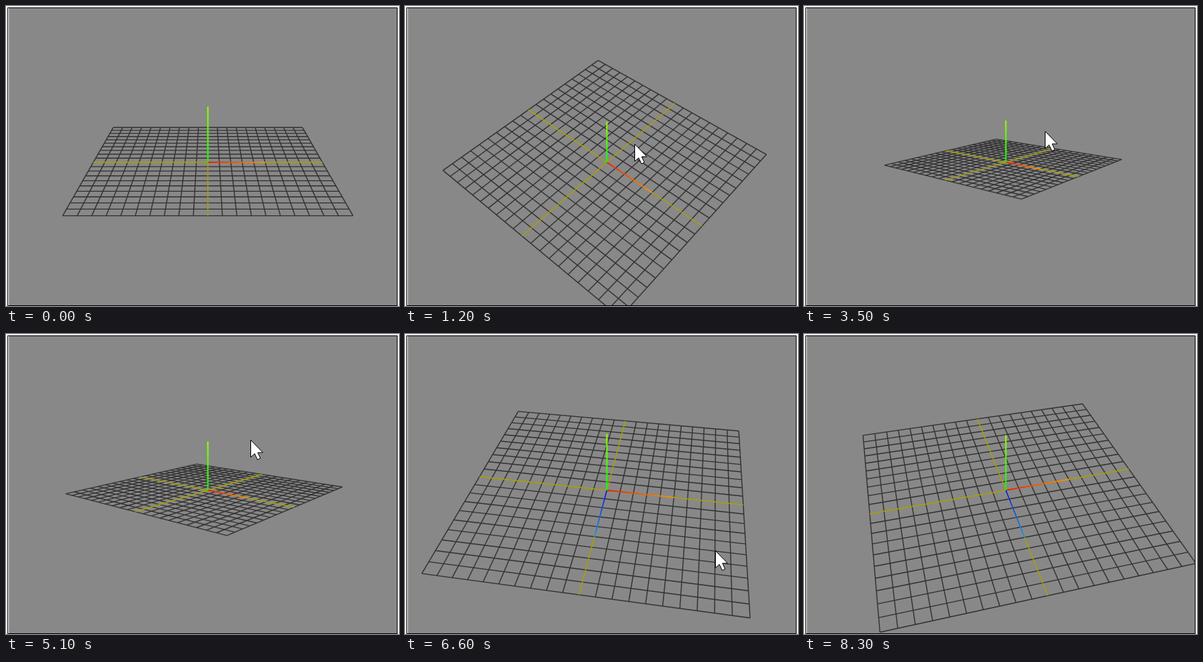
Animation, 550 px wide and 420 px high, one loop 8400 ms. Source, as an HTML page with a canvas:

```html
<!DOCTYPE html>
<html lang="en">
<head>
<meta charset="utf-8">
<title>Orbiting grid</title>
<style>
  html, body { margin: 0; width: 100%; height: 100%; overflow: hidden; background: #fff; }
  canvas { display: block; }
</style>
</head>
<body>
<canvas id="stage" width="550" height="420"></canvas>
<script>
const ctx = document.getElementById('stage').getContext('2d');
const LOOP = 8400, STEP = 100;
const CENTER = { x: 282.5, y: 218.8 };
const FOCAL = 707, BASE_DISTANCE = 4.41, ZOOM = 0.95;
const CELLS = 20, AXIS = 0.5;
const START_ELEVATION = 21.6, DEGREES_PER_PIXEL = 0.7;
const ARROW = new Path2D('M0 0V24L5.5 19L9.5 27.5L13.5 25.5L9.8 17.5H17Z');

// Turning points of the pointer: time, x, y
const pointerPath = [
  [100, 392, 165], [300, 381, 154], [1200, 322, 194], [2100, 325, 143],
  [3500, 338, 176], [5100, 343, 149], [5400, 350, 109], [5700, 393, 268],
  [6200, 387, 304], [6300, 398, 309], [7000, 485, 298], [7200, 470, 307],
  [7500, 536, 133]
];
// Times during which the button is held, so that the pointer turns the view
const drags = [[300, 2100], [5700, 7200]];
// Turns of the wheel: start, notches (positive moves away), one notch per step
const wheelTurns = [[2200, 3], [2700, 3], [3500, 2], [4100, -3], [4600, -2], [5100, -6]];

const clamp = (v, low, high) => Math.min(high, Math.max(low, v));

function pointerAt(t) {
  t = clamp(t, pointerPath[0][0], pointerPath.at(-1)[0]);
  const i = Math.max(1, pointerPath.findIndex(point => point[0] >= t));
  const [t0, x0, y0] = pointerPath[i - 1], [t1, x1, y1] = pointerPath[i];
  const k = (t - t0) / (t1 - t0);
  return { x: x0 + (x1 - x0) * k, y: y0 + (y1 - y0) * k };
}

function cameraAt(t) {
  let azimuth = 0, elevation = START_ELEVATION, notches = 0;
  for (const [from, to] of drags) {
    const a = pointerAt(from), b = pointerAt(clamp(t, from, to));
    azimuth -= (b.x - a.x) * DEGREES_PER_PIXEL;
    elevation += (b.y - a.y) * DEGREES_PER_PIXEL;
  }
  for (const [from, count] of wheelTurns) {
    notches += Math.sign(count) * clamp((t - from) / STEP, 0, Math.abs(count));
  }
  return { azimuth, elevation, distance: BASE_DISTANCE / ZOOM ** notches };
}

function makeProjection({ azimuth, elevation, distance }) {
  const a = azimuth * Math.PI / 180, e = elevation * Math.PI / 180;
  const ca = Math.cos(a), sa = Math.sin(a), ce = Math.cos(e), se = Math.sin(e);
  return (x, y, z) => {
    const near = x * sa + z * ca;
    const scale = FOCAL / (distance - near * ce - y * se);
    return [
      CENTER.x + (x * ca - z * sa) * scale,
      CENTER.y - (y * ce - near * se) * scale
    ];
  };
}

function drawLine(from, to, color, width = 1.4) {
  ctx.strokeStyle = color;
  ctx.lineWidth = width;
  ctx.beginPath();
  ctx.moveTo(...from);
  ctx.lineTo(...to);
  ctx.stroke();
}

function drawGrid(project) {
  const cross = (p, color) => {
    drawLine(project(-1, 0, p), project(1, 0, p), color);
    drawLine(project(p, 0, -1), project(p, 0, 1), color);
  };
  for (let i = 0; i <= CELLS; i++) {
    if (i !== CELLS / 2) cross(i * 2 / CELLS - 1, '#333');
  }
  cross(0, '#a8a000');
}

function drawAxis(project, tip, startColor, endColor, width) {
  const from = project(0, 0, 0), to = project(...tip);
  const gradient = ctx.createLinearGradient(...from, ...to);
  gradient.addColorStop(0, startColor);
  gradient.addColorStop(1, endColor);
  drawLine(from, to, gradient, width);
}

function drawPointer({ x, y }) {
  ctx.save();
  ctx.translate(Math.round(x) - 0.5, Math.round(y) - 0.5);
  ctx.fillStyle = '#fff';
  ctx.strokeStyle = '#000';
  ctx.lineWidth = 1;
  ctx.fill(ARROW);
  ctx.stroke(ARROW);
  ctx.restore();
}

function draw(t) {
  ctx.fillStyle = '#fff';
  ctx.fillRect(0, 0, 550, 420);
  ctx.fillStyle = '#888';
  ctx.fillRect(4, 3, 543, 416);

  ctx.save();
  ctx.beginPath();
  ctx.rect(4, 3, 543, 416);
  ctx.clip();
  const project = makeProjection(cameraAt(t));
  drawGrid(project);
  drawAxis(project, [AXIS, 0, 0], '#f00', '#f90');
  // The blue axis lies hidden in the grid until the second drag.
  if (t > drags[1][0]) drawAxis(project, [0, 0, AXIS], '#00f', '#09f');
  drawAxis(project, [0, AXIS, 0], '#0f0', '#9f0', 2);
  ctx.restore();

  ctx.strokeStyle = '#000';
  ctx.lineWidth = 1;
  ctx.strokeRect(2.5, 2.5, 545, 417);
  if (t >= 100 && t < 7600) drawPointer(pointerAt(t));
}

const start = performance.now();
let shown = -1;
function tick() {
  const elapsed = (performance.now() - start) % LOOP;
  const t = Math.floor(elapsed / STEP) * STEP;
  if (t !== shown) draw(shown = t);
  requestAnimationFrame(tick);
}
tick();
</script>
</body>
</html>
```
